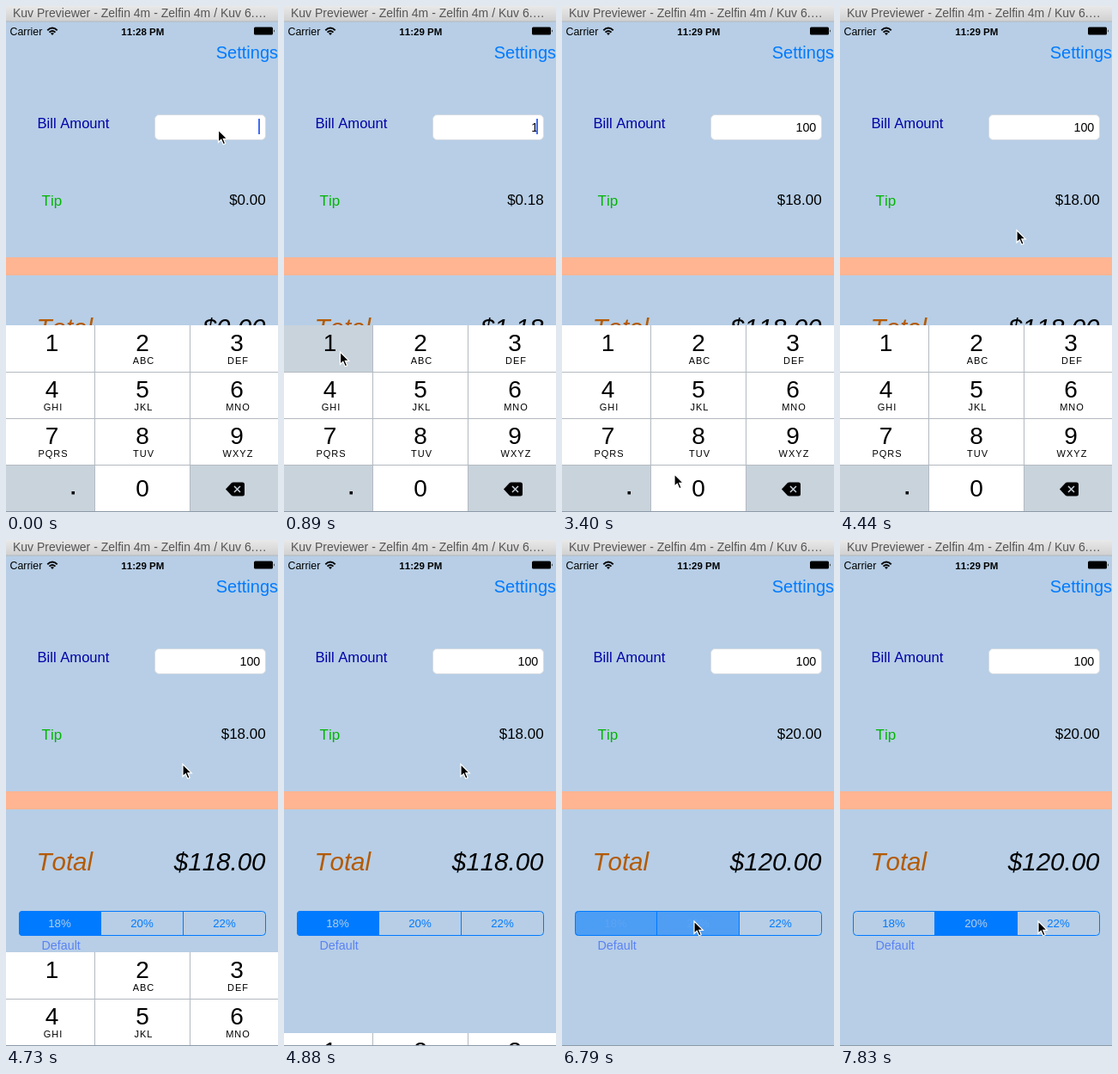
Write an HTML page that moves like this. It is 317 px wide and 588 px high and loops after 8000 ms.

```html
<!DOCTYPE html>
<html lang="en">
<head>
<meta charset="utf-8">
<title>Tip calculator</title>
<style>
  html, body { margin: 0; width: 100%; height: 100%; overflow: hidden; background: #b7cee6; }
  svg { display: block; width: 317px; height: 588px; font-family: "Liberation Sans", Arial, sans-serif; font-kerning: none; }
  .end { text-anchor: end; }
  .mid { text-anchor: middle; }
  .total { font-size: 29.5px; font-style: italic; }
  .amount { font-size: 17px; }
  .digit { font-size: 28px; text-anchor: middle; }
  .letters { font-size: 11px; letter-spacing: 1px; text-anchor: middle; }
  .seg { font-size: 13.3px; text-anchor: middle; }
</style>
</head>
<body>
<svg viewBox="0 0 317 588" xmlns="http://www.w3.org/2000/svg">
  <defs>
    <linearGradient id="bar" x2="0" y2="1">
      <stop stop-color="#e9e9e9"/><stop offset="1" stop-color="#d0d0d0"/>
    </linearGradient>
    <clipPath id="segClip"><rect x="15" y="431" width="288" height="29" rx="4"/></clipPath>
  </defs>
  <rect width="317" height="588" fill="#b7cee6"/>

  <rect width="317" height="18" fill="url(#bar)"/>
  <rect y="17.5" width="317" height="1" fill="#b4b9be"/>
  <text x="8" y="13" font-size="14" fill="#555">Kuv Previewer - Zelfin 4m - Zelfin 4m / Kuv 6.…</text>

  <text x="4.5" y="33.5" font-size="12.4">Carrier</text>
  <g fill="none" stroke="#000" stroke-width="1.9">
    <path d="M48.3 28.2Q54 22.8 59.7 28.2M50.5 30.6Q54 27.3 57.5 30.6"/>
    <path d="M54 34L52 31.8Q54 30.2 56 31.8Z" fill="#000" stroke="none"/>
  </g>
  <text id="clock" class="mid" x="159.3" y="33.5" font-size="11.5" font-weight="bold"></text>
  <rect x="289" y="24.5" width="22" height="9" rx="1.5"/>
  <path d="M312 27.3q1.8 1.7 0 3.4z"/>

  <text class="end" x="317" y="61" font-size="20" fill="#007aff">Settings</text>
  <text x="36.5" y="142" font-size="16.6" fill="#0000a8">Bill Amount</text>
  <rect x="173.5" y="126.5" width="129" height="29" rx="5" fill="#fff" stroke="#d5dbe2"/>
  <text id="bill" class="end" x="296.3" y="146" font-size="14.3"></text>
  <rect id="caret" x="294" y="131" width="2" height="18" fill="#426bf2"/>
  <text x="41.5" y="231.5" class="amount" fill="#00b400">Tip</text>
  <text id="tip" class="end amount" x="302.7" y="230.5"></text>

  <rect y="292" width="317" height="21" fill="#ffb592"/>
  <text class="total" x="35.5" y="383.5" fill="#b45a00">Total</text>
  <text id="total" class="end total" x="302.5" y="383.5"></text>

  <g id="segs" clip-path="url(#segClip)"></g>
  <rect x="15.5" y="431.5" width="287" height="28" rx="4" fill="none" stroke="#007aff"/>
  <path d="M110.5 431v29M206.5 431v29" stroke="#007aff"/>
  <g id="segText"></g>
  <text x="41.5" y="475.5" font-size="14.3" fill="#5a82f5">Default</text>

  <g id="pad"></g>
  <rect y="587" width="317" height="1" fill="#8d9aa8"/>
  <path id="mouse" d="M0 0V14.3L3.3 11.2L5.7 16.8L8.2 15.7L5.8 10.3H10.3Z" stroke="#fff" stroke-width="1.2"/>
</svg>
<script>
const LOOP = 8000, STEP = 147.7, LEAD = 15;
const KEY = '#c9d3dc', PAD_TOP = 371, PAD_HEIGHT = 217, CLOSE = 4635;
const $ = id => document.getElementById(id);
const clamp = v => Math.min(1, Math.max(0, v));
const smooth = p => p * p * (3 - 2 * p);
const money = n => '$' + n.toFixed(2);

function add(parent, tag, attrs, text) {
  const el = document.createElementNS('http://www.w3.org/2000/svg', tag);
  for (const k in attrs) el.setAttribute(k, attrs[k]);
  if (text) el.textContent = text;
  parent.append(el);
  return el;
}

// Number pad, drawn from its own top edge
const pad = $('pad');
const letters = ' ABC DEF GHI JKL MNO PQRS TUV WXYZ'.split(' ');
const keys = {};
add(pad, 'rect', { width: 317, height: PAD_HEIGHT, fill: '#b3bac1' });
[...'123456789.0<'].forEach((name, i) => {
  const c = i % 3, y = Math.floor(i / 3) * 54;
  const left = c && 111 * c - 7, right = c < 2 ? 103 + 111 * c : 317;
  const x = [53.5, 159, 269][c], top = y && y + 1;
  const side = name === '.' || name === '<';
  keys[name] = add(pad, 'rect', {
    x: left, y: top, width: right - left, height: y + 54 - top, fill: side ? KEY : '#fff'
  });
  if (side) return;
  add(pad, 'text', { class: 'digit', x, y: y + (name === '0' ? 37 : 30) }, name);
  add(pad, 'text', { class: 'letters', x: x + 1.5, y: y + 45 }, letters[i]);
});
add(pad, 'rect', { x: 76.5, y: 193, width: 3.5, height: 3.5 });
add(pad, 'path', { d: 'M256 190.5L262.5 183.5Q263.5 182.5 265 182.5H275.5Q278 182.5 278 185V196Q278 198.5 275.5 198.5H265Q263.5 198.5 262.5 197.5Z' });
add(pad, 'path', { d: 'M266 187l7 7m0-7l-7 7', stroke: KEY, 'stroke-width': 1.5 });

// Segmented control
const fills = [0, 1].map(i =>
  add($('segs'), 'rect', { x: 15 + 95.5 * i, y: 431, width: 96, height: 29, fill: '#007aff' }));
const labels = ['18%', '20%', '22%'].map((s, i) =>
  add($('segText'), 'text', { class: 'seg', x: 62.5 + 96 * i, y: 450, fill: '#007aff' }, s));

const taps = [
  { at: 880, digit: '1', hold: 140 },
  { at: 1900, digit: '0', hold: 0 },
  { at: 2650, digit: '0', hold: 140 }
];
const home = [247.5, 144];
const moves = [
  { from: 100, to: 730, x: 65.5, y: 402 },
  { from: 1080, to: 1610, x: 131, y: 544 },
  { from: 3450, to: 4420, x: 206, y: 260.5 },
  { from: 5370, to: 6190, x: 154, y: 443 },
  { from: 7300, to: 7820, x: 231, y: 443 }
];

function pointer(t) {
  let [x, y] = home;
  for (const m of moves) {
    const p = smooth(clamp((t - m.from) / (m.to - m.from)));
    x += (m.x - x) * p;
    y += (m.y - y) * p;
  }
  return `translate(${x} ${y})`;
}

// Critically damped slide out of view
function padY(t) {
  const w = 18.26 * Math.max(0, t - CLOSE) / 1000;
  return Math.round(PAD_TOP + PAD_HEIGHT * (1 - (1 + w) * Math.exp(-w)));
}

// Solid after each tap, then blinking once a second
function caret(t, tapped) {
  if (t > CLOSE) return 0;
  const s = Math.max(0, t - tapped - 340) / 1000;
  return clamp(.5 + 2 * Math.cos(2 * Math.PI * s));
}

function blend(p) {
  const rgb = [0, 122, 255].map((v, i) => Math.round(v + ([183, 206, 230][i] - v) * p));
  return `rgb(${rgb})`;
}

function draw(t) {
  const done = taps.filter(tap => tap.at <= t);
  const last = done[done.length - 1];
  const bill = done.map(tap => tap.digit).join('');
  const pick = clamp((t - 6720) / 150);
  const tip = bill * (pick ? .2 : .18);

  $('clock').textContent = t < 440 ? '11:28 PM' : '11:29 PM';
  $('bill').textContent = bill;
  $('tip').textContent = money(tip);
  $('total').textContent = money(+bill + tip);
  $('caret').setAttribute('opacity', caret(t, last ? last.at : 0));
  pad.setAttribute('transform', `translate(0 ${padY(t)})`);
  $('mouse').setAttribute('transform', pointer(t));
  for (const d of '10') {
    const lit = last && last.digit === d && t < last.at + last.hold;
    keys[d].setAttribute('fill', lit ? KEY : '#fff');
  }
  [1 - pick, pick].forEach((on, i) => {
    fills[i].setAttribute('opacity', on ** .8);
    labels[i].setAttribute('fill', blend(on));
  });
}

// The picture advances in even steps
const start = performance.now();
function tick() {
  const t = (performance.now() - start) % LOOP;
  draw(Math.floor((t + LEAD) / STEP) * STEP);
  requestAnimationFrame(tick);
}
tick();
</script>
</body>
</html>
```
